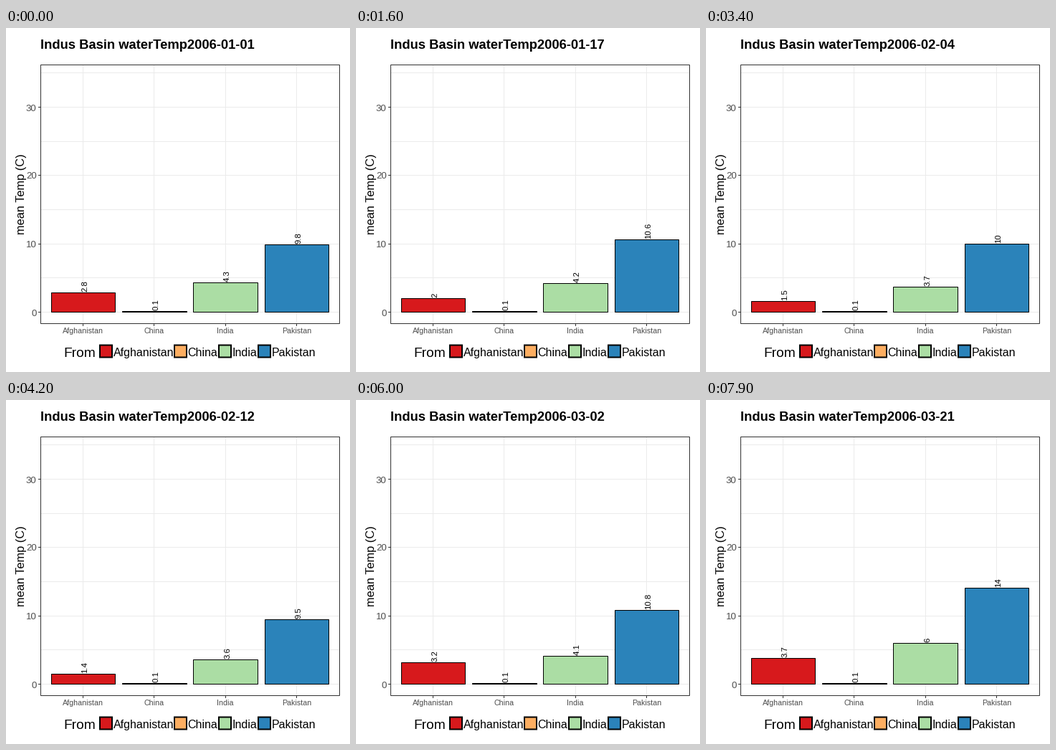
A matplotlib script for the animation above (8 s loop, 480 px wide and 480 px high).

```python
import numpy as np
import matplotlib.pyplot as plt
from matplotlib.animation import FuncAnimation
from matplotlib.patches import Rectangle

DAYS, STEP_MS = 80, 100
SIZE, DPI = 480, 100
PT = 72 / DPI  # points per pixel
LEFT, TOP, RIGHT, BOTTOM = 48, 51, 465, 412
ZERO, PER_DEGREE = 396, 9.53
HALF_BAR = 44.72
GRID, BORDER, TICK_TEXT = "#EBEBEB", "#333333", "#4D4D4D"

# name, bar colour, legend key x, mean temperature on the key days
KEY_DAYS = [0, 8, 24, 34, 50, 70, 79]
SERIES = [
    ("Afghanistan", "#D7191C", 130, [2.83, 2.42, 1.6, 1.54, 1.34, 4.96, 3.74]),
    ("China", "#FDAE61", 234, [0.1] * 7),
    ("India", "#ABDDA4", 296, [4.3, 4.32, 4.14, 3.7, 3.43, 4.73, 5.98]),
    ("Pakistan", "#2B83BA", 351, [9.84, 10.7, 10.44, 9.97, 9, 12.58, 14.02]),
]

plt.rcParams["font.family"] = "Liberation Sans"
plt.rcParams["path.snap"] = False
fig = plt.figure(figsize=(SIZE / DPI, SIZE / DPI), dpi=DPI, facecolor="white")
ax = fig.add_axes([0, 0, 1, 1])
ax.set_xlim(0, SIZE)
ax.set_ylim(SIZE, 0)
ax.axis("off")


def row(temp):
    return round(ZERO - PER_DEGREE * temp)


def line(x0, y0, x1, y1, color):
    ax.plot([x0, x1], [y0, y1], color=color, lw=PT, zorder=1,
            solid_capstyle="butt")


def label(x, y, text, px, **kw):
    return ax.text(x, y, text, fontsize=px * PT, zorder=5, va="baseline",
                   rotation_mode="anchor", **kw)


def box(x, y, w, h, fill, edge="black", width=1, z=2):
    return ax.add_patch(Rectangle((x, y), w, h, fc=fill, ec=edge,
                                  lw=width * PT, zorder=z,
                                  joinstyle="miter"))


# Value axis
for temp in range(0, 36, 5):
    y = row(temp) + 0.5
    line(LEFT, y, RIGHT, y, GRID)
    if temp % 10 == 0:
        line(LEFT - 3, y, LEFT, y, BORDER)
        label(42.7, y + 5, str(temp), 13.3, ha="right", color=TICK_TEXT)
label(26.5, 231.5, "mean Temp (C)", 16.4, rotation=90, ha="center")

# One column and one legend key per country
bars, tags = [], []
for i, (name, color, key_x, _) in enumerate(SERIES):
    cx = LEFT + 59.55 + 99.25 * i
    grid_x = round(cx - 0.3) + 0.5
    line(grid_x, TOP, grid_x, BOTTOM, GRID)
    line(grid_x, BOTTOM + 1, grid_x, BOTTOM + 4, BORDER)
    label(cx, 426.5, name, 10.6, ha="center", color=TICK_TEXT)

    x0, x1 = round(cx - HALF_BAR), round(cx + HALF_BAR)
    bars.append(box(x0 + 0.5, ZERO + 0.5, x1 - x0, 0, color))
    tags.append(label(cx + 6, ZERO, "", 11.4, rotation=90))

    box(key_x + 1, 442.5, 17, 17, color, width=2)
    label(key_x + 19.5, 458, name, 16)

box(LEFT + 0.5, TOP + 0.5, RIGHT - LEFT, BOTTOM - TOP, "none", BORDER, z=4)
label(80, 459, "From", 19.2)
title = label(48, 29, "", 18.35, weight="bold")


def draw(day):
    date = np.datetime64("2006-01-01") + day
    title.set_text(f"Indus Basin waterTemp{date}")
    for bar, tag, (*_, temps) in zip(bars, tags, SERIES):
        temp = np.interp(day, KEY_DAYS, temps)
        y = row(temp)
        bar.set_y(y + 0.5)
        bar.set_height(ZERO - y)
        tag.set_text(f"{round(temp, 1):g}")
        tag.set_y(y - 1)
    return [title, *bars, *tags]


anim = FuncAnimation(fig, draw, frames=DAYS, interval=STEP_MS, repeat=True,
                     repeat_delay=0, blit=False)
plt.show()
```
